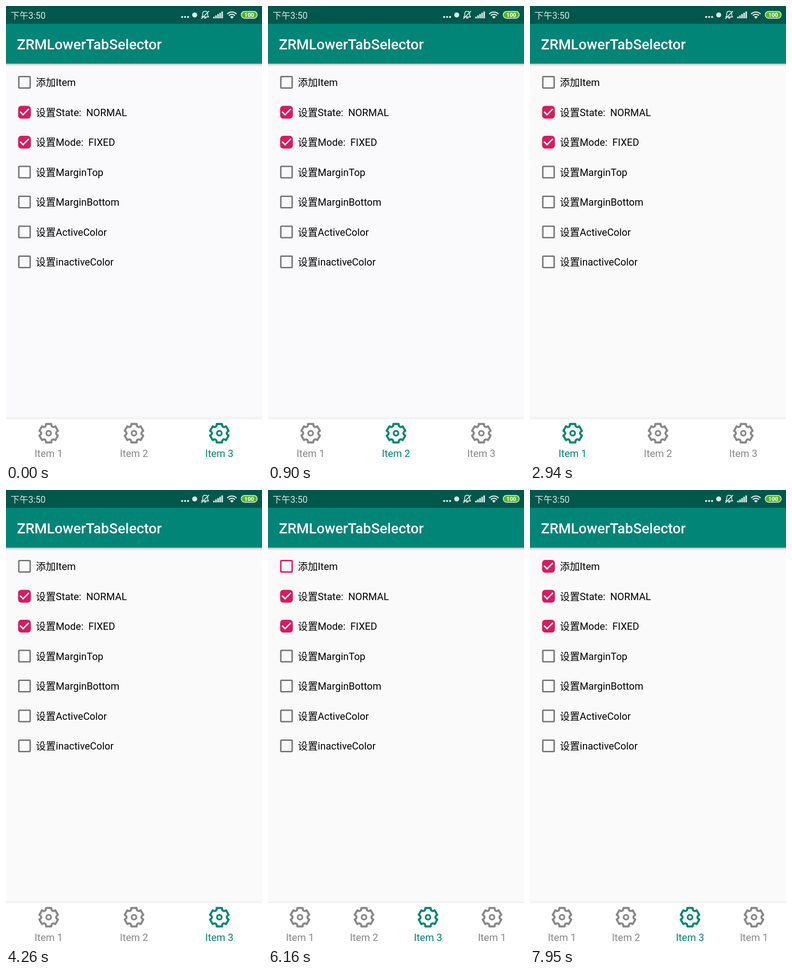
These frames come from a looping animation (561x998 px, 8000 ms). An HTML page:

```html
<!DOCTYPE html>
<html lang="zh-CN">
<head>
<meta charset="utf-8">
<title>Bottom tabs</title>
<style>
  html, body { margin: 0; width: 100%; height: 100%; overflow: hidden; background: #fafafa; }
  svg { display: block; width: 100vw; height: 100vh; }
  text { font-family: Roboto, "Noto Sans CJK SC", "Noto Sans CJK", sans-serif; white-space: pre; }
</style>
</head>
<body>
<svg id="stage" viewBox="0 0 561 998">
  <defs>
    <linearGradient id="barShade" x2="0" y2="1">
      <stop stop-color="#000" stop-opacity=".3"/>
      <stop offset=".4" stop-color="#000" stop-opacity=".1"/>
      <stop offset="1" stop-color="#000" stop-opacity="0"/>
    </linearGradient>
    <linearGradient id="navShade" x2="0" y2="1">
      <stop stop-color="#000" stop-opacity="0"/>
      <stop offset="1" stop-color="#000" stop-opacity=".05"/>
    </linearGradient>
  </defs>
  <rect id="page" width="561" height="998"/>
  <rect y="126" width="561" height="7" fill="url(#barShade)"/>
  <rect width="561" height="39.5" fill="#00574b"/>
  <rect y="39" width="561" height="87" fill="#008577"/>
  <text x="24" y="95" font-size="31.2" font-weight="500" fill="#fff">ZRMLowerTabSelector</text>

  <g id="status" fill="#dde8e6">
    <text x="10" y="27.5" font-size="19.5">下午3:50</text>
    <circle cx="386" cy="24" r="2.3"/>
    <circle cx="392.5" cy="24" r="2.3"/>
    <circle cx="399" cy="24" r="2.3"/>
    <circle cx="413.5" cy="19.5" r="5.5"/>
    <g fill="none" stroke="#dde8e6" stroke-width="1.8" stroke-linejoin="round">
      <path d="M429 24H444L442 21V17.5C442 13 439.500 11.500 436.500 11.500S431 13 431 17.500V21Z"/>
      <path d="M434 26.500H439M445 11L428 28"/>
    </g>
    <g fill="none" stroke="#dde8e6" stroke-width="2.6">
      <path d="M484.700 17.500A14.500 14.500 0 0 1 505.300 17.500M488.300 21A9.500 9.500 0 0 1 501.700 21"/>
    </g>
    <path d="M495 28L490.800 23.600A6 6 0 0 1 499.200 23.600Z"/>
    <rect x="515.500" y="11.800" width="35" height="15" rx="7.500" fill="#55b425" stroke="#dde8e6" stroke-width="1.8"/>
    <text x="533" y="24" font-size="12.500" font-weight="700" text-anchor="middle" fill="#fff">100</text>
  </g>

  <g id="list"></g>
  <rect y="898" width="561" height="6" fill="url(#navShade)"/>
  <rect y="904" width="561" height="94" fill="#fff"/>
  <g id="nav"></g>
</svg>
<script>
const LOOP = 8000, W = 561;
const TEAL = '#008577', PINK = '#d81b60', GREY = '#888888', BOX = '#747474';
const TAPS = [{ at: 500, item: 1 }, { at: 2540, item: 0 }, { at: 4260, item: 2 }];
const CHECK_AT = 6160, FILLED_AT = 6600, PRESS_AT = 7910;
const ROWS = ['添加Item', '设置State:  NORMAL', '设置Mode:  FIXED', '设置MarginTop',
  '设置MarginBottom', '设置ActiveColor', '设置inactiveColor'];

const $ = id => document.getElementById(id);
const clamp = x => Math.max(0, Math.min(1, x));
const ramp = (t, a, b) => clamp((t - a) / (b - a));
const mix = (a, b, p) => a + (b - a) * p;
const ease = p => p * p * (3 - 2 * p);

function set(el, attrs) {
  for (const k in attrs) el.setAttribute(k, attrs[k]);
  return el;
}

function add(parent, tag, attrs, text) {
  const el = set(document.createElementNS('http://www.w3.org/2000/svg', tag), attrs);
  if (text) el.textContent = text;
  return parent.appendChild(el);
}

function gearPath() {
  const pt = (deg, r) => {
    const a = deg * Math.PI / 180;
    return (r * Math.sin(a)).toFixed(2) + ' ' + (-r * Math.cos(a)).toFixed(2);
  };
  let d = 'M' + pt(-16, 21);
  for (let a = 0; a < 360; a += 60)
    d += `L${pt(a + 16, 21)}C${pt(a + 22, 15)} ${pt(a + 38, 15)} ${pt(a + 44, 21)}`;
  return d + 'Z';
}

// Tick drawn from its corner outwards, p = 0..1
function tickPath(p) {
  const x = -3.1, y = 5.6;
  return `M${mix(x, -9.8, p)} ${mix(y, -1.1, p)}L${x} ${y}L${mix(x, 9.8, p)} ${mix(y, -7.3, p)}`;
}

function makeRow(label, i) {
  const y = 167 + 65.5 * i;
  const g = add($('list'), 'g', { transform: `translate(40.5 ${y})` });
  const ripple = add(g, 'circle', { fill: PINK, opacity: 0 });
  const icon = add(g, 'g', {});
  const box = add(icon, 'rect', { fill: 'none' });
  const tick = add(icon, 'path', { fill: 'none', stroke: '#fafafa', 'stroke-width': 3.1 });
  add(g, 'text', { x: 25, y: 8.3, 'font-size': 21.8, fill: '#000' }, label);
  return { ripple, icon, box, tick };
}

function drawBox(row, fill, tick, color, scale = 1) {
  const w = mix(3.1, 14, fill), o = -14 + w / 2;
  set(row.box, { x: o, y: o, width: 28 - w, height: 28 - w, rx: Math.max(0, 3 - w / 2),
    stroke: color, 'stroke-width': w, 'stroke-linejoin': 'round' });
  set(row.tick, { d: tickPath(tick), opacity: tick > 0 ? 1 : 0 });
  set(row.icon, { transform: `scale(${scale})` });
}

function makeItem(n) {
  const g = add($('nav'), 'g', {});
  const ripple = add(g, 'circle', { cy: 935, fill: '#000', opacity: 0 });
  const gear = add(g, 'g', { transform: 'translate(0 935)', fill: 'none', 'stroke-linejoin': 'round' });
  add(gear, 'path', { d: gearPath(), 'stroke-width': 4.4 });
  add(gear, 'circle', { r: 5.2, 'stroke-width': 3.8 });
  const label = add(g, 'text', { y: 986.5, 'font-size': 22, 'text-anchor': 'middle' }, 'Item ' + n);
  return { g, ripple, gear, label };
}

for (let i = 0; i < 5; i++) {
  const h = 3.5 + 2.9 * i;
  add($('status'), 'rect', { x: 454 + 4.5 * i, y: 27 - h, width: 3.4, height: h });
}
const rows = ROWS.map(makeRow);
rows.forEach((row, i) => {
  const on = i === 1 || i === 2;
  drawBox(row, on ? 1 : 0, on ? 1 : 0, on ? PINK : BOX);
});
const items = [1, 2, 3, 1].map(makeItem);

function drawNav(t) {
  const count = t < CHECK_AT ? 3 : 4;
  const tap = TAPS.filter(s => t >= s.at).pop();
  const active = tap ? tap.item : 2;
  items.forEach((it, i) => {
    const color = i === active ? TEAL : GREY;
    set(it.g, { transform: `translate(${W * (i + 0.5) / count} 0)`, visibility: i < count ? 'visible' : 'hidden' });
    set(it.gear, { stroke: color });
    set(it.label, { fill: color });
    const dt = tap && i === active ? t - tap.at : 0;
    set(it.ripple, { r: 24.5 * ramp(dt, 0, 150), opacity: 0.055 * (1 - ramp(dt, 220, 650)) });
  });
}

function drawCheck(t) {
  const row = rows[0];
  const fill = ease(ramp(t, CHECK_AT + 20, FILLED_AT - 20));
  const tick = t < FILLED_AT ? 0 : mix(0.1, 1, ease(ramp(t, FILLED_AT, 6860)));
  const scale = 1 - 0.09 * fill + 0.09 * ease(ramp(t, FILLED_AT, 6860));
  drawBox(row, fill, tick, t < CHECK_AT ? BOX : PINK, scale);

  let alpha = 0, r = 31;
  if (t >= PRESS_AT) alpha = 0.012;
  else if (t >= CHECK_AT) {
    alpha = mix(0.012, 0.075, ramp(t, CHECK_AT, 6400)) * (1 - ramp(t, 6620, 6880));
    r = mix(27, 31, ramp(t, CHECK_AT, 6400));
  }
  set(row.ripple, { r, opacity: alpha });
}

function draw(t) {
  set($('page'), { fill: t < 1300 ? '#fafafd' : '#fafafa' });
  drawNav(t);
  drawCheck(t);
}

const start = performance.now();
function tick(now) {
  draw(Math.max(0, now - start) % LOOP);
  requestAnimationFrame(tick);
}
draw(0);
requestAnimationFrame(tick);
</script>
</body>
</html>
```
